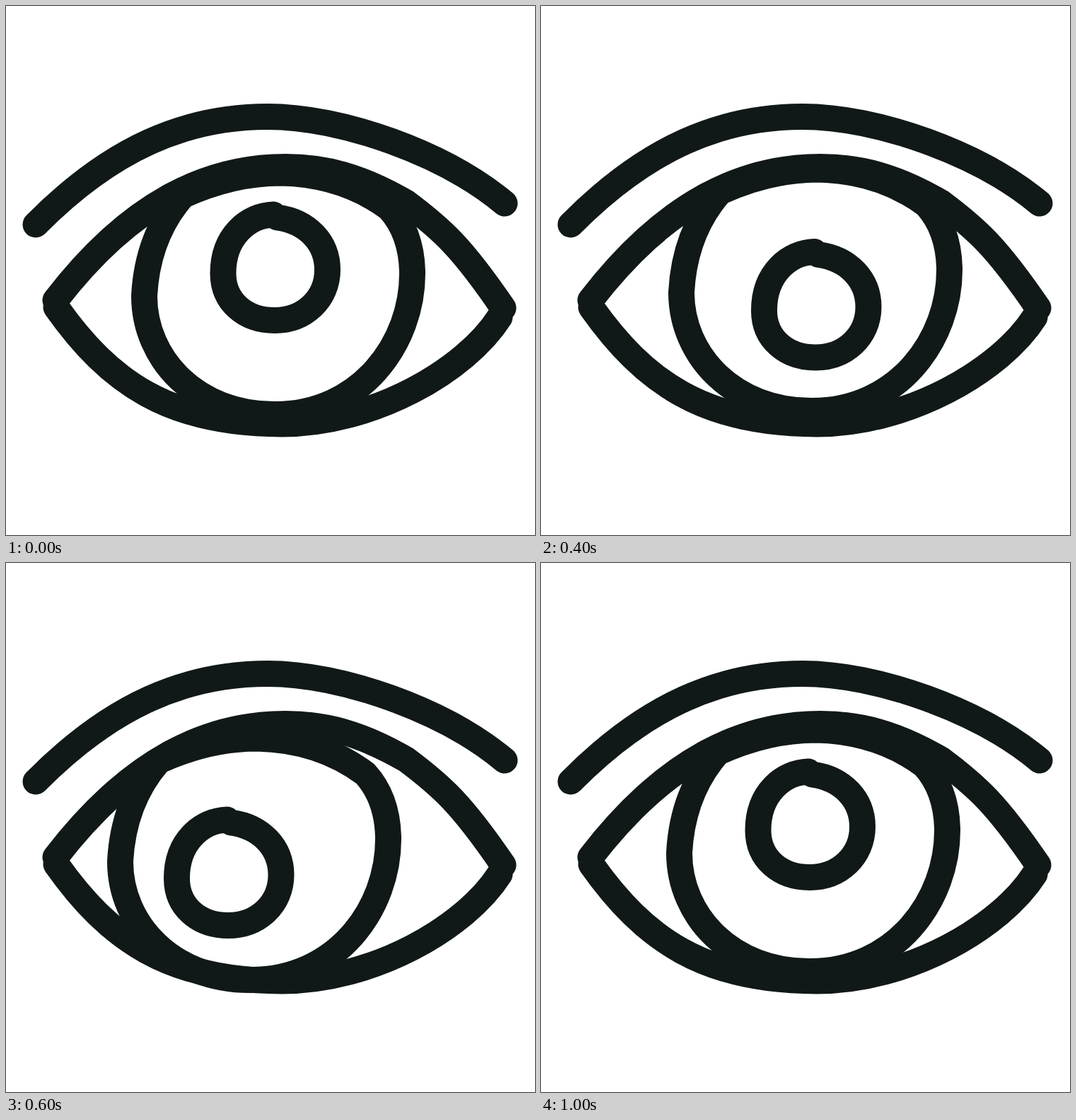
Recreate the animation shown at these times as an HTML page. Size 748 by 748 pixels, loop 1200 ms.

```html
<!DOCTYPE html>
<html lang="en">
<head>
<meta charset="utf-8">
<title>Looking eye</title>
<style>
html, body { margin: 0; height: 100%; overflow: hidden; background: #fff; }
svg { display: block; width: 100%; height: 100%; }
path { fill: none; stroke: #111918; stroke-width: 37; stroke-linecap: round; stroke-linejoin: round; }
</style>
</head>
<body>
<svg viewBox="0 0 748 748">
  <!-- brow -->
  <path d="M42 309C150 200 255 156.5 370 156.5C475 156.5 620 208 705 279"/>
  <!-- upper and lower lid -->
  <path d="M70 416C180 273 290 227.5 395 227.5C450 227.5 500 240 566 278C617 316 645 342 703 427"/>
  <path d="M698 440C650 515 520 591 390 591C230 591 146 532 71 426"/>
  <path id="iris" d="M574.5 375C576 478 500 578 380 577.5C270 578 195.5 500 195.5 410Q200 325 250 268Q320 236 389 236Q478 238 542 286Q573 320 574.5 375Z"/>
  <path id="pupil" d="M384 299C427 305 454.5 335 454.5 373C454.5 414 422 444.5 380 444.5C338 444.5 307 418 307 378C307 325 343 296 378 295"/>
</svg>
<script>
// Where the eye looks at each step: offsets of iris and pupil
const looks = [
  { iris: [0, 0], pupil: [0, 0] },
  { iris: [51, 1], pupil: [86.5, 21.5] },
  { iris: [3, -5], pupil: [8.5, 52.5] },
  { iris: [-34, 12], pupil: [-65.5, 68] },
  { iris: [-34, 12], pupil: [-86.5, -2] },
  { iris: [0, 0], pupil: [0, 0] }
];
const stepMs = 200;
const start = performance.now();

function tick() {
  const step = Math.floor((performance.now() - start) / stepMs) % looks.length;
  for (const [id, shift] of Object.entries(looks[step])) {
    document.getElementById(id).setAttribute('transform', `translate(${shift})`);
  }
  requestAnimationFrame(tick);
}
tick();
</script>
</body>
</html>
```
